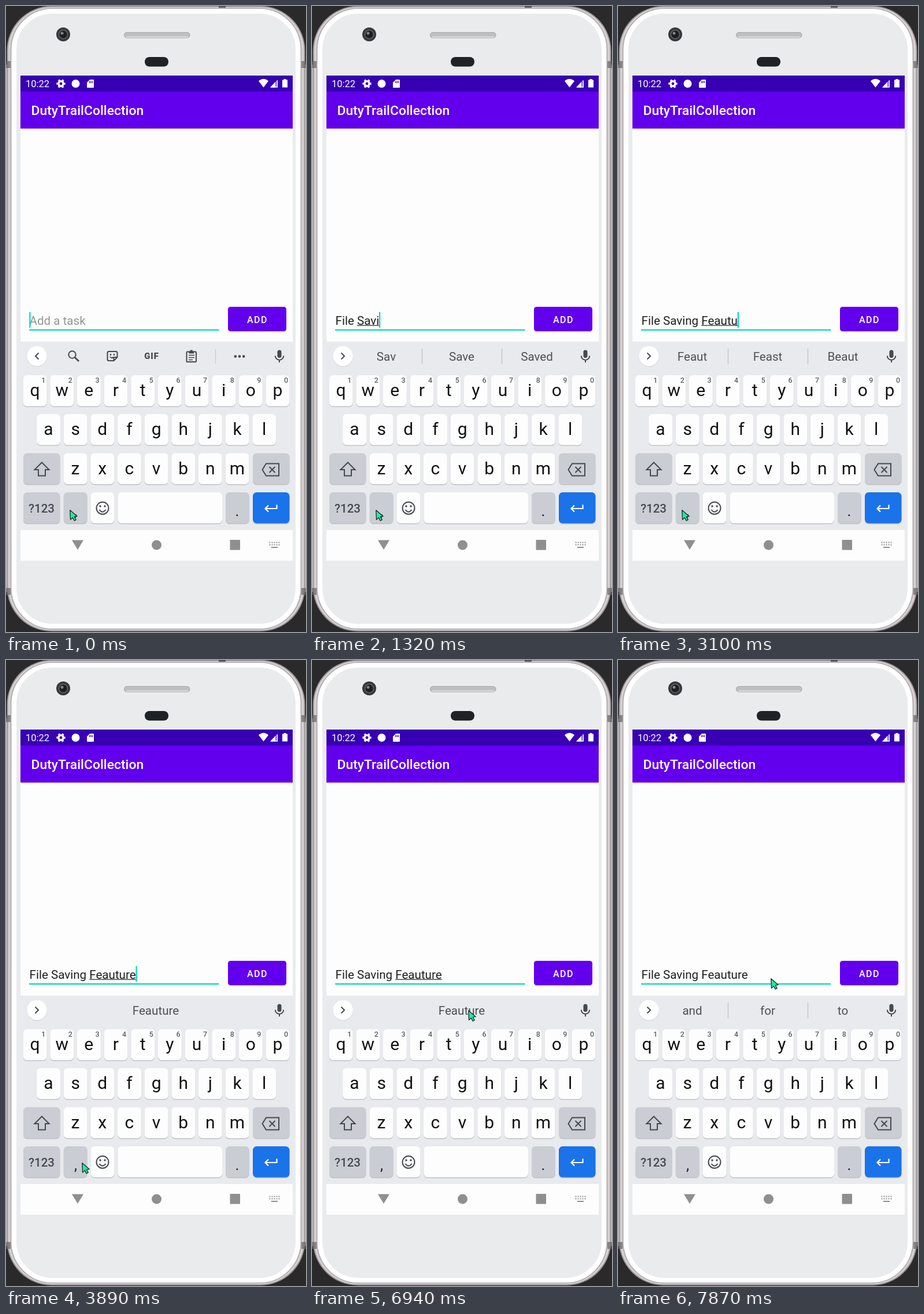
An HTML page for the animation above (8 s loop, 519 by 1080 pixels).

```html
<!DOCTYPE html>
<html lang="en">
<head>
<meta charset="utf-8">
<title>Task entry</title>
<style>
  html, body { margin: 0; width: 100%; height: 100%; overflow: hidden; background: #2a2a2a; }
  svg { display: block; width: 519px; height: 1080px; }
  text { font-family: Roboto, sans-serif; white-space: pre; }
  .mid { text-anchor: middle; }
  .entry, .word { font-size: 20.6px; }
  .word { fill: #4c4f53; }
  .letter { font-size: 30px; fill: #101113; }
  .digit { font-size: 12.5px; font-weight: 500; fill: #5c6064; }
  .line { fill: none; stroke: #45484c; stroke-width: 2; }
</style>
</head>
<body>
<svg viewBox="0 0 519 1080">
  <!-- phone body -->
  <rect y="101" width="519" height="910" fill="#c9c3c5"/>
  <rect x="2.5" y="1" width="514" height="1077" rx="76" fill="#d5d0d2" stroke="#9c9597" stroke-width="2"/>
  <path d="M0 101H8M511 101H519M0 1010H8M511 1010H519" stroke="#696365" stroke-width="12" opacity=".7"/>
  <path d="M368 1.5H380" stroke="#5a5557" stroke-width="3"/>
  <rect x="8.5" y="4.5" width="502" height="1070" rx="71" fill="#f0eff0" stroke="#aaa4a6" stroke-width="1.5"/>
  <rect x="14" y="9" width="491" height="1061" rx="66" fill="#e9ebed" stroke="#fff" stroke-width="8"/>
  <circle cx="99" cy="49" r="12" fill="#37383a"/>
  <circle cx="99" cy="49" r="7.5" fill="#1c1e20" stroke="#65686b" stroke-width="1.5"/>
  <circle cx="97" cy="47" r="2.5" fill="#7e878c"/>
  <rect x="204.5" y="45.500" width="113.500" height="9.500" rx="4.500" fill="#bdbfc1" stroke="#a6a8aa"/>
  <path d="M208 53.500H315" stroke="#dedfe0" stroke-width="2"/>
  <rect x="240" y="88" width="41" height="16.500" rx="8" fill="#202325"/>

  <!-- app -->
  <rect x="25" y="120" width="471" height="837" fill="#fdfdfd"/>
  <rect x="25" y="120" width="471" height="28" fill="#3700b3"/>
  <rect x="25" y="147.500" width="471" height="64" fill="#6200ee"/>
  <g fill="#fff">
    <text x="34" y="140" font-size="16.500">10:22</text>
    <text x="43.500" y="188" font-size="22.900" font-weight="500">DutyTrailCollection</text>
    <circle cx="95" cy="134" r="4.200" fill="none" stroke="#fff" stroke-width="3.600"/>
    <circle cx="95" cy="134" r="6.600" fill="none" stroke="#fff" stroke-width="2.200" stroke-dasharray="3.450" stroke-dashoffset="1.700"/>
    <circle cx="120.500" cy="134" r="7"/>
    <path d="M145 127H151Q152 127 152 128V140Q152 141 151 141H141Q140 141 140 140V132Z"/>
    <path d="M144.500 129.500V133M147 129.500V133M149.500 129.500V133" stroke="#3700b3" stroke-width="1.300"/>
    <path d="M437 129.500Q445.500 122 454 129.500L445.500 140.500Z"/>
    <path d="M457 140.500L470 127V140.500Z" opacity=".4"/>
    <path d="M457 140.500L466 131V140.500Z"/>
    <path d="M469.300 128.500V139.800H458.500" fill="none" stroke="#fff" stroke-width="1.400"/>
    <path d="M480.500 126H484.500V127.500H487V140.500H478V127.500H480.500Z"/>
  </g>
  <rect x="40" y="557.800" width="328.500" height="2.200" fill="#03d5c5"/>
  <text id="hint" class="entry" x="40.500" y="549.500" fill="#949494">Add a task</text>
  <text class="entry" x="40.500" y="549.500" fill="#202020"><tspan id="done"></tspan><tspan id="word"></tspan></text>
  <rect id="under" y="550.500" height="1.300" fill="#303030"/>
  <rect id="caret" y="528" width="2.200" height="27" fill="#03d5c5"/>
  <rect x="384" y="520" width="101" height="42.500" rx="4.500" fill="#000" opacity=".16"/>
  <rect x="384" y="519" width="101" height="42" rx="4.500" fill="#6200ee"/>
  <text x="417" y="546.500" font-size="16" font-weight="500" letter-spacing="1.430" fill="#fff">ADD</text>

  <!-- keyboard -->
  <rect x="25" y="579" width="471" height="325" fill="#e8eaed"/>
  <rect id="press" x="69" y="579" width="383" height="51" fill="#000" opacity=".08"/>
  <circle cx="53.500" cy="605" r="17.500" fill="#d3d5d8"/>
  <circle cx="53.500" cy="604" r="17.200" fill="#fff"/>
  <path id="chevron" class="line"/>
  <g id="tools">
    <g class="line">
      <circle cx="114.500" cy="601.500" r="6.200"/><path d="M119 606L126 613" stroke-width="2.600"/>
      <path d="M178 596H190Q192.500 596 192.500 598.500V606L186.500 612H178Q175.500 612 175.500 609.500V598.500Q175.500 596 178 596ZM192 606H188Q186.500 606 186.500 608V612M180 605Q183 609 186 605.500"/>
      <path d="M181 600V603M187 600V603"/>
      <rect x="312.500" y="596.500" width="16.500" height="17.500" rx="1.500"/>
      <path d="M316 602.500H326M316 606.500H326M316 610.500H323" stroke-width="1.700"/>
      <path d="M316.500 597.500H325M320.700 593.500V597" stroke-width="4"/>
      <path d="M362.500 592V617" stroke="#c6c9cd" stroke-width="1.200"/>
    </g>
    <text class="mid" x="252" y="609.300" font-size="14.800" font-weight="900" letter-spacing="1" fill="#45484c">GIF</text>
    <g fill="#45484c"><circle cx="396.800" cy="604.500" r="2.300"/><circle cx="404" cy="604.500" r="2.300"/><circle cx="411.200" cy="604.500" r="2.300"/></g>
  </g>
  <path id="bars" d="M190.500 591V618M328.500 591V618" stroke="#c3c6ca" stroke-width="1.500"/>
  <text class="word mid" x="128.500" y="612"></text>
  <text class="word mid" x="259" y="612"></text>
  <text class="word mid" x="389" y="612"></text>
  <rect x="469.500" y="593.500" width="7" height="13.500" rx="3.500" fill="#45484c"/>
  <path class="line" d="M465.800 603.500A7.200 7.200 0 0 0 480.200 603.500M473 611V615"/>
  <g id="keys"></g>
  <path class="line" d="M62 787.500L74.500 800H68V810.500H56V800H49.500Z"/>
  <path class="line" d="M450 789.500H472V810.500H450L443.500 800ZM455.500 795L465.500 805M465.500 795L455.500 805"/>
  <circle class="line" cx="167" cy="866.300" r="10.500"/>
  <path class="line" d="M161.500 869Q167 876.500 172.500 869" stroke-width="2.200"/>
  <g fill="#45484c"><circle cx="163" cy="863" r="1.700"/><circle cx="171" cy="863" r="1.700"/></g>
  <path d="M468.500 860.500V867H449M454 861.500L448.500 867L454 872.500" fill="none" stroke="#fff" stroke-width="2.200"/>

  <!-- navigation -->
  <g fill="#8f8f8f">
    <path d="M114 921.500H134L124 938Z"/>
    <circle cx="260.500" cy="930" r="8.500"/>
    <rect x="387.500" y="921" width="17.500" height="17.500" rx="1"/>
  </g>
  <path d="M455.500 925.500H474M455.500 929.500H474" stroke="#8f8f8f" stroke-width="2" stroke-dasharray="2 2"/>
  <path d="M459 934H470" stroke="#8f8f8f" stroke-width="2"/>
  <path id="mouse" d="M.800.800L1.500 17.200L5.300 13.600L8.200 19L11.200 17.400L8.400 12.200L13.200 11.400Z" fill="#2ce5a2" stroke="#0c332b" stroke-width="1.300" stroke-linejoin="round"/>
</svg>
<script>
const LOOP = 8000;
const LEFT = 40.5;
const $ = id => document.getElementById(id);
const put = (tag, attrs, label = "") => {
  const el = document.createElementNS("http://www.w3.org/2000/svg", tag);
  for (const name in attrs) el.setAttribute(name, attrs[name]);
  el.textContent = label;
  $("keys").append(el);
};

// Keyboard
function key(x, y, width, fill) {
  const box = { x, width, height: 53.5, rx: 6.5 };
  put("rect", { ...box, y: y + 1.5, fill: "#bfc2c6" });
  put("rect", { ...box, y, fill });
}
const PITCH = 46.65, WHITE = "#fdfdfd", GREY = "#cacdd3";
[["qwertyuiop", 50, 637], ["asdfghjkl", 73.5, 704], ["zxcvbnm", 120, 771.5]].forEach(([row, start, y], r) => {
  [...row].forEach((letter, i) => {
    const x = start + i * PITCH;
    key(x - 20.3, y, 40.8, WHITE);
    put("text", { class: "letter mid", x, y: y + 36 }, letter);
    if (!r) put("text", { class: "digit mid", x: x + 14.7, y: 650 }, (i + 1) % 10);
  });
});
key(30, 771.5, 63.5, GREY);
key(427, 771.5, 63.5, GREY);
key(30, 839, 63.5, GREY);
key(99.8, 839, 40.8, GREY);
key(146.5, 839, 40.8, WHITE);
key(193.5, 839, 180.5, WHITE);
key(380, 839, 40.8, GREY);
key(427, 839, 63.5, "#1a73e8");
put("text", { class: "mid", x: 61.5, y: 874, "font-size": 20.5, "font-weight": 500, fill: "#45484c" }, "?123");
put("text", { class: "mid", x: 120.5, y: 880, "font-size": 26, fill: "#202124" }, ",");
put("text", { class: "mid", x: 400, y: 880, "font-size": 26, fill: "#202124" }, ".");

// Typing: time, text, suggestions, then flags: c caret, u underlined word, p pressed suggestion
const A = "File ", B = "File Saving ";
const typing = [
  [0, "", "", "c"],
  [150, "F", "", "cu"],
  [270, "F", "F|For|From", "cu"],
  [420, "Fi", "F|For|From", "cu"],
  [540, "Fi", "Fi|First|Find", "cu"],
  [690, "Fil", "Fi|First|Find", "cu"],
  [810, "File", "Fil|File|Film", "cu"],
  [930, A, "File|Files|Filed", "c"],
  [1080, A + "S", "and|is|to", "cu"],
  [1200, A + "Sav", "S|So|See", "cu"],
  [1320, A + "Savi", "Sav|Save|Saved", "cu"],
  [1470, A + "Savin", "Savi|Saving|Savior", "cu"],
  [1620, A + "Saving", "Savin|Saving|Savings", "cu"],
  [1740, B, "Saving|Savings|Savin", "c"],
  [1890, B, "and|for|the", "c"],
  [2010, B + "F", "and|for|the", "cu"],
  [2160, B + "Fe", "F|For|From", "cu"],
  [2310, B + "Fe", "Fe|Feel|Few", "cu"],
  [2430, B + "Fea", "Fea|Fear|Few", "cu"],
  [2550, B + "Feau", "Fea|Fear|Few", "cu"],
  [2670, B + "Feaut", "Feau|Beau|Feat", "cu"],
  [2790, B + "Feaut", "Feaut|Feast|Beaut", "cu"],
  [3100, B + "Feautu", "Feaut|Feast|Beaut", "cu"],
  [3220, B + "Feautu", "Feautu", "cu"],
  [3370, B + "Feauture", "Feautur", "cu"],
  [3490, B + "Feauture", "Feauture", "cu"],
  [4010, B + "Feauture", "Feauture", "u"],
  [4410, B + "Feautur", "Feauture", "cu"],
  [4560, B + "Feautu", "Feautur", "cu"],
  [4710, B + "Feautu", "Feautu", "cu"],
  [5110, B + "Feautu", "Feautu", "u"],
  [5640, B + "Feautu", "Feautu", "cu"],
  [6040, B + "Feautur", "Feautu", "cu"],
  [6160, B + "Feautur", "Feautur", "cu"],
  [6280, B + "Feauture", "Feautur", "cu"],
  [6430, B + "Feauture", "Feauture", "cu"],
  [6820, B + "Feauture", "Feauture", "u"],
  [7060, B + "Feauture", "Feauture", "up"],
  [7210, B + "Feauture ", "and|for|to", "c"],
  [7600, B + "Feauture ", "and|for|to", ""]
];

// Pointer: time, x, y
const pointer = [
  [0, 110, 869], [3890, 131, 867], [4010, 159, 865],
  [6430, 221, 750], [6550, 272, 625], [6670, 292, 551],
  [6820, 287, 582], [6940, 270, 604], [7210, 276, 645],
  [7330, 290, 594], [7480, 276, 581], [7600, 256, 569],
  [7750, 238, 560], [7870, 264, 549]
];

const at = (steps, t) => steps.findLast(step => step[0] <= t);
const show = (el, on) => { el.style.display = on ? "" : "none"; };
const words = document.querySelectorAll(".word");
let current;

function drawTyping(step) {
  if (step === current) return;
  current = step;
  const [, text, list, flags] = step;
  const cut = text.lastIndexOf(" ") + 1;
  $("done").textContent = text.slice(0, cut);
  $("word").textContent = text.slice(cut);
  const start = LEFT + (cut ? $("done").getComputedTextLength() : 0);
  const width = cut < text.length ? $("word").getComputedTextLength() : 0;
  $("under").setAttribute("x", start);
  $("under").setAttribute("width", width);
  $("caret").setAttribute("x", start + width - 0.2);
  show($("under"), flags.includes("u"));
  show($("caret"), flags.includes("c"));
  show($("press"), flags.includes("p"));
  show($("hint"), !text);
  show($("tools"), !list);
  const parts = list.split("|");
  const shown = parts.length > 1 ? parts : ["", list, ""];
  words.forEach((el, i) => { el.textContent = shown[i]; });
  show($("bars"), parts.length > 1);
  $("chevron").setAttribute("d", list ? "M50.5 598.5L56 604L50.500 609.500" : "M56.500 598.500L51 604L56.500 609.500");
}

const began = performance.now();
function frame() {
  const t = (performance.now() - began) % LOOP;
  drawTyping(at(typing, t));
  const [, x, y] = at(pointer, t);
  $("mouse").setAttribute("transform", `translate(${x} ${y})`);
  requestAnimationFrame(frame);
}
frame();
</script>
</body>
</html>
```
